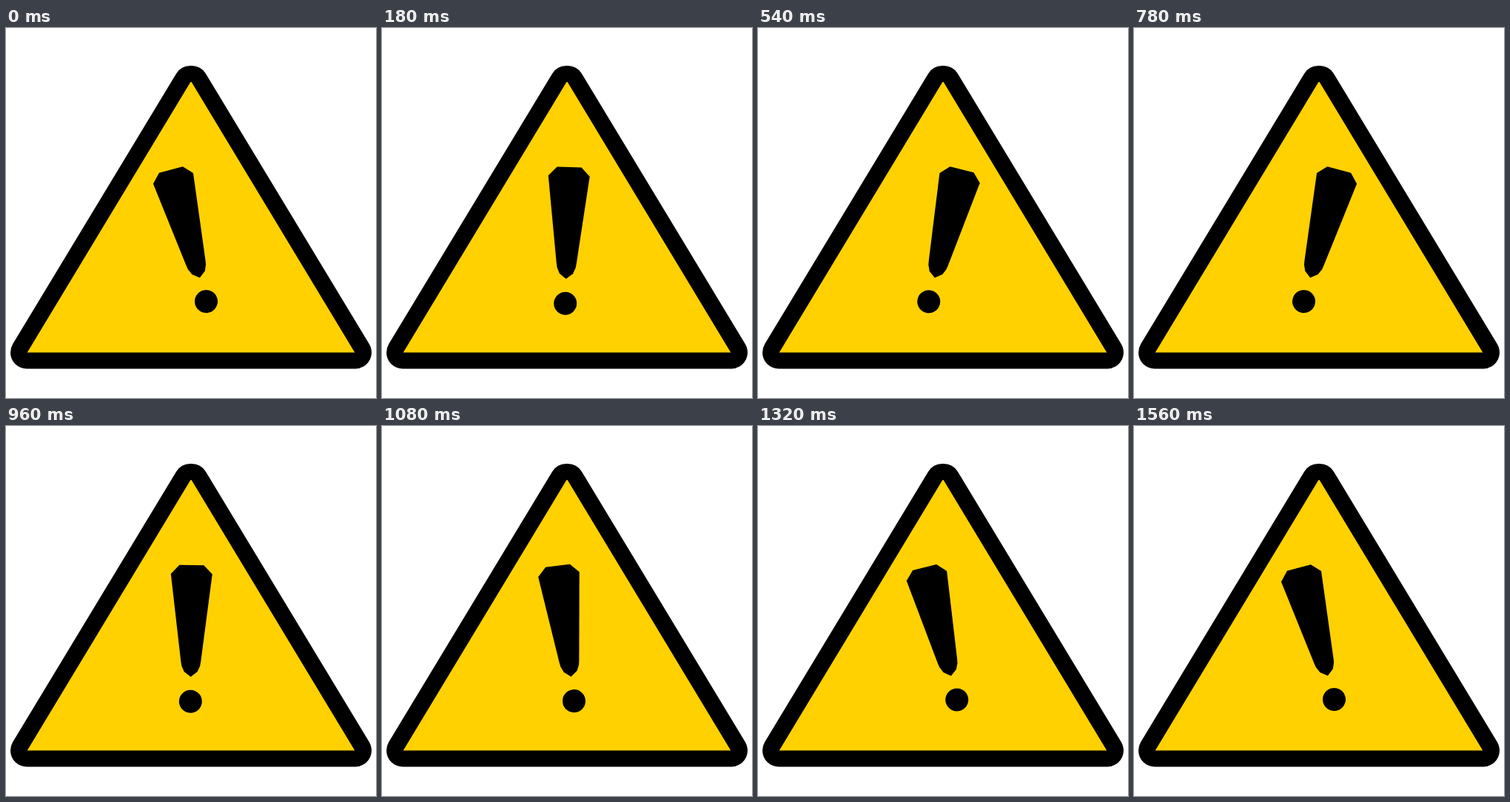
An HTML page without scripts for the animation above (1620 ms loop, 500 px wide and 500 px high).

```html
<!DOCTYPE html>
<html lang="en">
<head>
<meta charset="utf-8">
<title>Warning sign</title>
<style>
  @property --frame { syntax: "<number>"; inherits: true; initial-value: 0; }

  html, body { margin: 0; width: 100%; height: 100%; overflow: hidden; background: #fff; }
  svg { display: block; width: 100%; height: 100%; }

  .border { stroke: #000; stroke-width: 44; stroke-linejoin: round; }
  .panel { fill: #ffd100; }

  /* Each swing lasts half the loop; what is left of it (1 to 0) is eased out. */
  .mark {
    --swing: calc(var(--frame) / 13.5);
    --right: max(0, 1 - var(--swing));
    --left: min(1, 2 - var(--swing));
    --right-left-over: calc(var(--right) * var(--right) * var(--right) * (3 + var(--right)) / 4);
    --left-left-over: calc(var(--left) * var(--left) * var(--left) * (3 + var(--left)) / 4);
    transform: rotate(calc(15deg - 30deg * (var(--right-left-over) + 1 - var(--left-left-over))));
    animation: tick 1620ms steps(27) -1ms infinite;
  }
  @keyframes tick { from { --frame: 0; } to { --frame: 27; } }
</style>
</head>
<body>
<svg viewBox="0 0 500 500">
  <path class="border" d="M249 73 H251 L472 438.5 H28 Z"/>
  <path class="panel" d="M249.2 73.3 Q250 72.3 250.8 73.3 L471.3 438.6 H28.7 Z"/>
  <g transform="translate(250 293)">
    <g class="mark">
      <path d="M-28-93 L-16.5-105 H16.5 L28-93 L13.5 25 L12.5 31 L9 39 L0 46 L-9 39 L-12.5 31 L-13.5 25 Z"/>
      <circle cy="79.2" r="15.5"/>
    </g>
  </g>
</svg>
</body>
</html>
```
